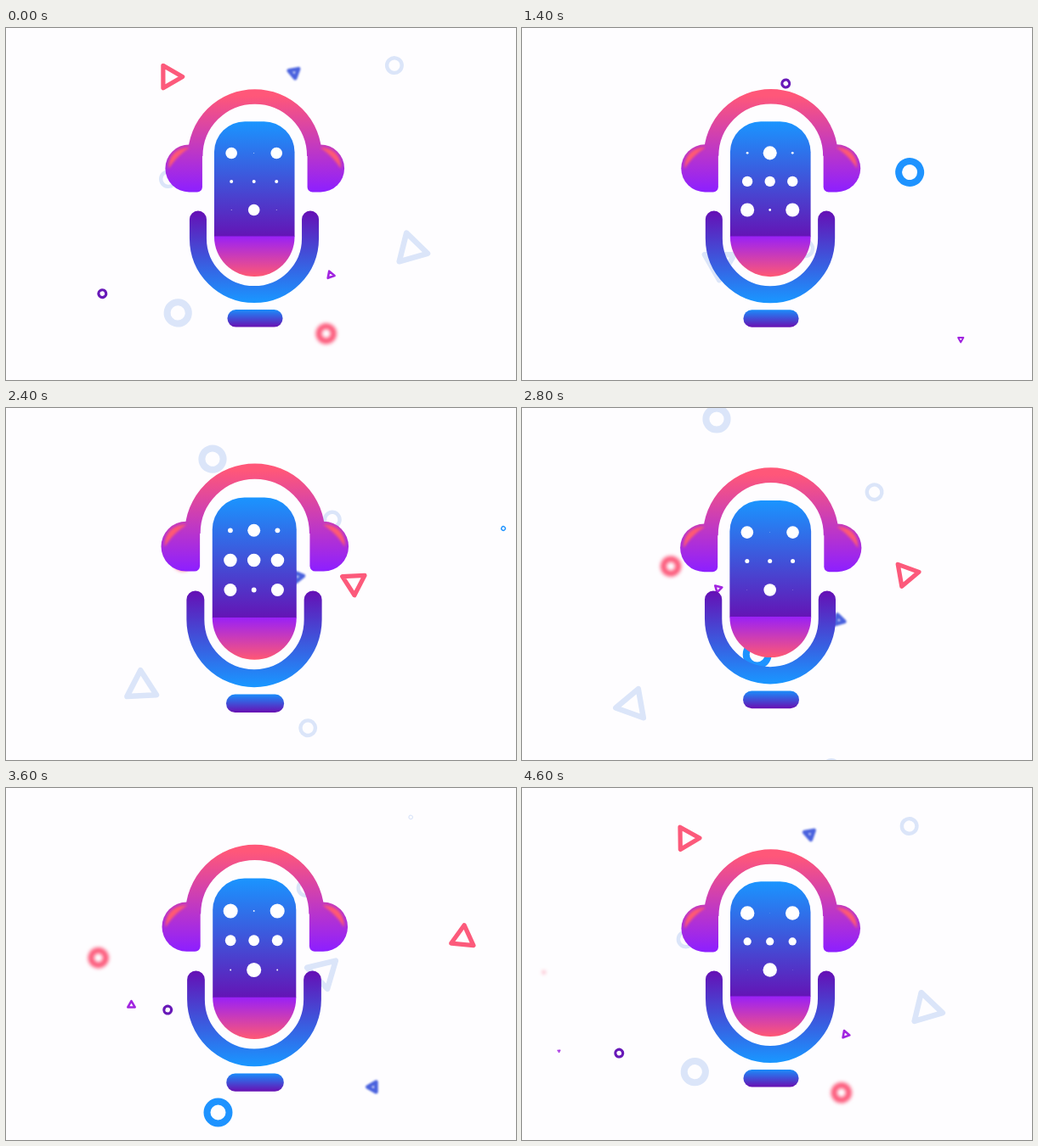
Animation, 600 px wide and 415 px high, one loop 4700 ms. Source, as an HTML page with a canvas:

```html
<!DOCTYPE html>
<html lang="en">
<head>
<meta charset="utf-8">
<title>Microphone</title>
<style>
html, body { margin: 0; width: 100%; height: 100%; overflow: hidden; background: #fefdff; }
canvas { display: block; }
</style>
</head>
<body>
<canvas id="stage" width="600" height="415"></canvas>
<script>
const ctx = document.getElementById('stage').getContext('2d');
const LOOP = 4700, STEP = 100, DRIFT = 4612, FADE = 800, TAU = Math.PI * 2;
const SPIN = 0.057; // degrees per ms
const CX = 292, CY = 214.5;

const ring = (color, r, w, blur = 0) => ({ color, r, w, blur });
const tri = (color, r, w, blur = 0) => ({ color, r, w, blur, sides: 3 });

const paleRing = ring('#dbe5f9', 8.8, 4.4);
const paleBig = ring('#dbe5f9', 12.6, 8);
const darkRing = ring('#6819b8', 4.4, 3.2);
const blueRing = ring('#1e93ff', 13, 8);
const pinkRing = ring('#fc5a7b', 8.7, 7, 2);
const paleTri = tri('#dbe5f9', 20, 6.5);
const pinkTri = tri('#fc5a7b', 15.2, 5.2, 0.5);
const indigoTri = tri('#4a62de', 6.6, 4.8, 1);
const violetTri = tri('#a124e0', 4.8, 2.6);

// A shape drifts straight out from behind the microphone at (vx, vy) px/s.
// At time t it is at (x, y), turned by `turn` degrees, and begins to shrink.
const shapes = [];
function drift(kind, t, x, y, vx, vy, turn = 0) {
  const toCentre = ((x - CX) * vx + (y - CY) * vy) / (vx * vx + vy * vy);
  shapes.push({ kind, t, x, y, vx, vy, turn, born: t - toCentre * 1000 });
}

drift(paleBig, 700, 138.5, 408, -91, 103);
drift(paleBig, 2800, 229, 13, -35, -118);
drift(paleRing, 700, 529, -7, 103, -73);
drift(paleRing, 700, 93, 162, -140, -23);
drift(paleRing, 3000, 430, 83, 77, -81);
drift(paleRing, 2800, 364, 424, 22, 117);
drift(darkRing, 320, 89, 329.5, -76, 51);
drift(darkRing, 2000, 305.5, 11.5, -8, -90);
drift(blueRing, 1740, 500, 160.5, 129, -28);
drift(blueRing, 3600, 249.5, 382.5, -34, 115);
drift(pinkRing, 700, 432, 424, 79, 91);
drift(pinkRing, 3910, 83, 205.5, -83, 17);
drift(paleTri, 700, 548, 291, 102, 43, 54);
drift(paleTri, 2800, 130, 350, -73, 52, 50);
drift(pinkTri, 300, 161, 14, -105, -145, 17);
drift(pinkTri, 3800, 559, 172, 107, -24, 167);
drift(indigoTri, 300, 351, 7.5, 40, -150, 97);
drift(indigoTri, 3600, 432, 352.5, 74, 128, 60);
drift(violetTri, 1200, 497, 356, 96, 54, 79);
drift(violetTri, 4100, 95.5, 283, -104, 54, 58);

function drawShape({ kind, t, x, y, vx, vy, turn, born }, now) {
  const dt = now - t;
  if (now < born || dt >= FADE) return;
  const size = Math.min(1, 1 - dt / FADE);
  ctx.save();
  ctx.translate(x + vx * dt / 1000, y + vy * dt / 1000);
  ctx.rotate((turn + SPIN * dt) * TAU / 360);
  ctx.scale(size, size);
  if (kind.blur) ctx.filter = `blur(${kind.blur}px)`;
  ctx.strokeStyle = kind.color;
  ctx.lineWidth = kind.w;
  ctx.lineJoin = 'round';
  ctx.beginPath();
  if (!kind.sides) ctx.arc(0, 0, kind.r, 0, TAU);
  for (let i = 0; i < kind.sides; i++) {
    const a = i * TAU / kind.sides;
    ctx.lineTo(kind.r * Math.cos(a), kind.r * Math.sin(a));
  }
  ctx.closePath();
  ctx.stroke();
  ctx.restore();
}

function fade(y0, y1, from, to) {
  const g = ctx.createLinearGradient(0, y0, 0, y1);
  g.addColorStop(0, from);
  g.addColorStop(1, to);
  return g;
}

function box(x, y, w, h, radii, fill) {
  ctx.fillStyle = fill;
  ctx.beginPath();
  ctx.roundRect(x, y, w, h, radii);
  ctx.fill();
}

const headFill = fade(80, 193, '#ff5779', '#8d1fff');
const bodyFill = fade(110, 246, '#1a95ff', '#6414b5');
const tipFill = fade(245, 293, '#9820f8', '#ff5874');
const cradleFill = fade(218, 322, '#6412b6', '#1a95ff');
const baseFill = fade(332, 352, '#1a8cfa', '#6712b4');

function drawEar() {
  box(187.5, 137.5, 43.5, 56, [28, 0, 6, 28], headFill);
  ctx.save();
  ctx.filter = 'blur(1.6px)';
  ctx.fillStyle = '#ff5a72';
  ctx.beginPath();
  ctx.moveTo(191.5, 166);
  ctx.bezierCurveTo(191, 150, 201, 141, 216, 141);
  ctx.bezierCurveTo(207, 147, 199, 154, 191.5, 166);
  ctx.fill();
  ctx.restore();
}

function drawHeadphones() {
  ctx.strokeStyle = headFill;
  ctx.lineWidth = 17.5;
  ctx.beginPath();
  ctx.arc(292.75, 151, 70, Math.PI, TAU);
  ctx.stroke();
  drawEar();
  ctx.save();
  ctx.translate(585.5, 0);
  ctx.scale(-1, 1);
  drawEar();
  ctx.restore();
}

// The middle row pulses together; around it, neighbouring dots take turns.
function peakOf(col, row) {
  if (row === 1) return 0.66;
  return (col === 1) === (row === 0) ? 0.43 : 0.86;
}

function drawDots(t) {
  ctx.fillStyle = '#fff';
  for (let row = 0; row < 3; row++) {
    for (let col = 0; col < 3; col++) {
      const r = 4.2 + 4.1 * Math.cos(TAU * (t * 5 / LOOP - peakOf(col, row)));
      ctx.beginPath();
      ctx.arc(265.2 + 26.5 * col, 147.5 + 33.5 * row, r, 0, TAU);
      ctx.fill();
    }
  }
}

function drawMic(t) {
  const s = 1 + 0.025 * (1 + Math.cos(TAU * (t * 3 / LOOP - 0.46)));
  ctx.save();
  ctx.translate(CX, CY);
  ctx.scale(s, s);
  ctx.translate(-CX, -CY);

  drawHeadphones();

  ctx.strokeStyle = cradleFill;
  ctx.lineWidth = 20;
  ctx.lineCap = 'round';
  ctx.beginPath();
  ctx.moveTo(226, 225.5);
  ctx.arc(CX, 248, 66, Math.PI, 0, true);
  ctx.lineTo(358, 225.5);
  ctx.stroke();

  box(260.5, 332, 65, 20.5, 10, baseFill);
  box(245, 110.4, 94.5, 135.6, [36, 36, 0, 0], bodyFill);
  box(245, 245.5, 94.5, 47.5, [0, 0, 47, 47], tipFill);
  drawDots(t);
  ctx.restore();
}

function draw(now) {
  const t = Math.floor(now % LOOP / STEP) * STEP;
  ctx.fillStyle = '#fefdff';
  ctx.fillRect(0, 0, 600, 415);
  for (const s of shapes) {
    drawShape(s, t);
    drawShape(s, t - DRIFT);
  }
  drawMic(t);
}

const start = performance.now();
function tick() {
  draw(performance.now() - start);
  requestAnimationFrame(tick);
}
tick();
</script>
</body>
</html>
```
